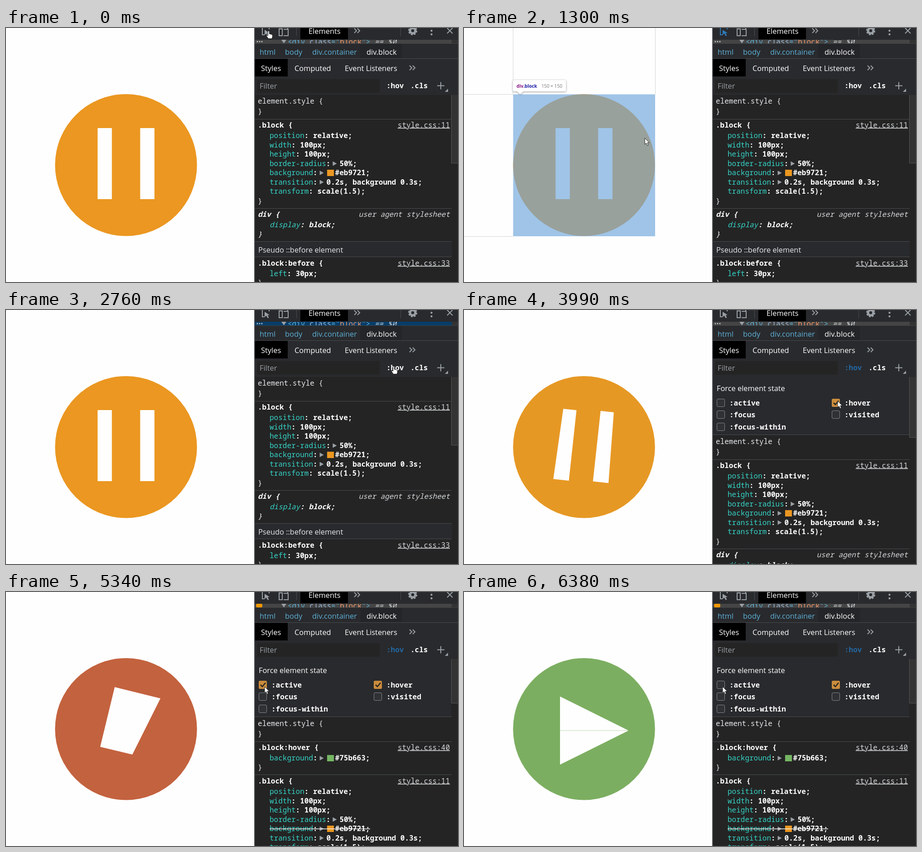
Animation of 998 by 561 pixels, one loop 7.26 s. Source, as an HTML page:

```html
<!DOCTYPE html>
<html lang="en">
<head>
<meta charset="utf-8">
<title>Forcing element states</title>
<style>
html, body { margin: 0; width: 100%; height: 100%; overflow: hidden; background: #fefefe; }
svg { display: block; width: 998px; height: 561px; }
text { font: 16.4px "Open Sans", "Noto Sans", sans-serif; fill: #fff; white-space: pre; }
.m { font: 500 16px "Noto Sans Mono", "DejaVu Sans Mono", monospace; }
.v { font-weight: 600; }
.b { font-weight: 700; }
.i { font-style: italic; }
.n { fill: #35d4c7; font-weight: 500; }
.s { fill: #e8eaed; }
.link { fill: #d5d7da; text-decoration: underline; }
.plain { fill: #d5d7da; }
.end { text-anchor: end; }
.tip { font-size: 10.2px; }
.ico { fill: none; stroke: #9aa0a6; stroke-width: 2; }
</style>
</head>
<body>
<svg id="stage" viewBox="0 0 998 561"></svg>
<script>
const LOOP = 7260, CH = 9.6;
const BAR = '#292a2d', BODY = '#242424', EDGE = '#494c50', ROW = '#454545';
const ORANGE = [235, 151, 33], GREEN = [124, 174, 97], RED = [213, 79, 53];

// ---- markup helpers ----
const text = (x, y, s, cls = '', fill = '') =>
  `<text x="${x}" y="${y}" class="${cls}"${fill && ` style="fill:${fill}"`}>${s}</text>`;
const rect = (x, y, w, h, fill, more = '') =>
  `<rect x="${x}" y="${y}" width="${w}" height="${h}" fill="${fill}" ${more}/>`;
const path = (d, more = 'class="ico"') => `<path d="${d}" ${more}/>`;
const group = (id, body) => `<g id="${id}">${body}</g>`;
const rule = y => rect(549, y, 435, 1, EDGE);
const mono = (x, y, s, cls = 's') => text(x, y, s, 'm ' + cls);
const link = (y, line) => mono(980, y, 'style.css:' + line, 'link end');

// One declaration; `arrow` adds the expander, `color` the swatch
function prop(y, name, value, { arrow, color, cls = 'v' } = {}) {
  let x = 582 + (name.length + 1) * CH, out = '';
  if (arrow) out += path(`M${x + 5} ${y - 10}v10l9 -5z`, 'fill="#9aa0a6"');
  x += arrow ? 20 : CH;
  if (color) {
    out += rect(Math.round(x + 1), y - 12, 15, 14, color);
    x += 19;
  }
  return mono(582, y, `<tspan class="n">${name}</tspan>:`, cls) + out + mono(x, y, value, cls);
}
const strike = (id, y) => group(id, rect(582, y - 5.5, 222, 1.4, '#fff'));

const stateRule = (id, state, line, hex) => group(id,
  mono(556, 219.5, `.block:${state} {`, 'v') + link(219.5, line) +
  prop(243, 'background', hex + ';', { arrow: 1, color: hex }) +
  mono(556, 263.5, '}') + rule(274));

function checkbox(x, y, label, id) {
  return rect(x + .5, y + .5, 17, 17, '#303134', 'rx="2.5" stroke="#85888c"') +
    (id ? group(id, rect(x, y, 18, 18, '#cb8c3c', 'rx="3"') +
      path(`M${x + 4} ${y + 9}l4 4l7 -8.5`, 'fill="none" stroke="#222" stroke-width="2.5"')) : '') +
    mono(x + 28, y + 14.5, label, 'v');
}
const chevrons = (x, y) => path(`M${x} ${y - 5}l5 5l-5 5m7 -10l5 5l-5 5`, 'class="ico" stroke-width="1.5"');

// ---- page side ----
const page =
  '<circle id="disc" cx="265" cy="302.7" r="156.7"/>' +
  '<polygon id="left" fill="#fefefe"/><polygon id="right" fill="#fefefe"/>' +
  group('overlay',
    rect(108.5, 146.5, 313.5, 313.5, 'rgba(111,168,220,.66)') +
    path('M108.5 0V146M422.5 0V146M0 146.5H108M0 460.5H108', 'stroke="#d3d6d8" fill="none"') +
    '<g style="filter:drop-shadow(0 1px 2px #0006)">' +
    path('M111 115H222a3 3 0 0 1 3 3V137a3 3 0 0 1 -3 3H131l-7 6l-7 -6H111a3 3 0 0 1 -3 -3V118a3 3 0 0 1 3 -3z', 'fill="#fff"') +
    '</g>' +
    text(116, 132, '<tspan style="fill:#881280">div</tspan>.block', 'tip b', '#1a1aa6') +
    text(171, 132, '150 × 150', 'tip', '#777'));

// ---- tools side ----
const rest = group('rest',
  mono(556, 219.5, '.block {', 'v') + link(219.5, 11) +
  prop(243, 'position', 'relative;') +
  prop(263.5, 'width', '100px;') +
  prop(284, 'height', '100px;') +
  prop(304.5, 'border-radius', '50%;', { arrow: 1 }) +
  prop(325, 'background', '#eb9721;', { arrow: 1, color: '#eb9721' }) + strike('strikeBase', 325) +
  prop(345.5, 'transition', '0.2s, background 0.3s;', { arrow: 1 }) +
  prop(366, 'transform', 'scale(1.5);') +
  mono(556, 387.5, '}') + rule(398) +
  mono(556, 417, 'div {', 'i v') + mono(980, 417, 'user agent stylesheet', 'i end plain') +
  prop(440, 'display', 'block;', { cls: 'i v' }) +
  mono(556, 461, '}', 'i') +
  rect(549, 472, 435, 33, BAR) + rule(471) + rule(505) +
  text(557, 495.5, 'Pseudo ::before element', 's') +
  mono(556, 524.5, '.block:before {', 'v') + link(524.5, 33) +
  prop(548, 'left', '30px;') + mono(556, 568, '}'));

const tools =
  rect(549, 0, 449, 561, BODY) +
  '<g clip-path="url(#below)">' + group('rules',
    mono(556, 166.5, 'element.style {') + mono(556, 190, '}') + rule(201) +
    stateRule('activeRule', 'active', 45, '#dd4b2f') +
    group('hoverRule', stateRule('hoverBody', 'hover', 40, '#75b663') + strike('strikeHover', 243)) +
    rest) + '</g>' +
  rect(984, 108, 14, 453, BODY) +
  rect(983.5, 108.5, 15, 190, '#333', 'id="thumb" stroke="#555"') +
  group('states', rect(549, 148, 434, 127, BAR) + rule(275) +
    text(558, 179, 'Force element state') +
    checkbox(558, 196, ':active', 'checkActive') + checkbox(812, 196, ':hover', 'checkHover') +
    checkbox(558, 222, ':focus') + checkbox(812, 222, ':visited') + checkbox(558, 249, ':focus-within')) +
  rect(549, 0, 449, 148, BAR) +
  // main toolbar
  rect(650, 0, 105, 25, '#000') + text(668, 13, 'Elements') + chevrons(769, 6) +
  group('pick', path('M581 3V-3H566V15H571') + path('M571 4V15.5L574.5 12.5L578 18L580.5 16.5L577.5 11.5L582 11z', 'fill="currentColor"')) +
  path('M606 -3H622V4M603 2H610V17H603zM613 17H623V3H613') +
  rect(641, 0, 1, 18, EDGE) + rect(871, 0, 1, 18, EDGE) +
  '<circle cx="898" cy="6" r="5.8" fill="none" stroke="#9aa0a6" stroke-width="5"/>' +
  '<circle cx="898" cy="6" r="8.6" fill="none" stroke="#9aa0a6" stroke-width="3" stroke-dasharray="4 2.75"/>' +
  [-2, 6, 14].map(y => `<circle cx="939.5" cy="${y}" r="2.2" fill="#9aa0a6"/>`).join('') +
  path('M974 0l12 12m0 -12l-12 12') +
  // selected tree row
  '<g clip-path="url(#row)">' + rect(549, 26, 435, 8, ROW, 'id="rowBg"') + rect(984, 26, 14, 8, '#333') +
  group('more', [555, 560, 565].map(x => `<circle cx="${x}" cy="30" r="1.5" fill="#c5c8cb"/>`).join('')) +
  '<circle id="mark" cx="559" cy="30" r="7" fill="#f29900"/>' +
  path('M608 26h11l-5.5 8z', 'fill="#9aa0a6"') +
  text(622, 36, '&lt;div <tspan style="fill:#9bbbdc">class</tspan>="<tspan style="fill:#f29766">block</tspan>"&gt;', 'm', '#5db0d7') +
  mono(814, 36, '== $0', 'i plain') + '</g>' +
  rect(549, 34, 449, 1, '#3c4043') +
  // breadcrumbs, tabs, filter
  rect(782, 35, 92, 32, '#242528') +
  [[560, 'html'], [616, 'body'], [676, 'div.container']].map(a => text(a[0], 59, a[1], '', '#5db0d7')).join('') +
  text(796, 59, 'div.block') + rect(549, 67, 449, 1, EDGE) +
  rect(549, 68, 73, 39, '#000') + text(563, 95, 'Styles') + text(637, 95, 'Computed') +
  text(748, 95, 'Event Listeners') + chevrons(891, 88) +
  rect(554, 113, 271, 30, BODY) + text(560, 134, 'Filter', '', '#9aa0a6') +
  '<text id="hov" x="840" y="133" class="m b">:hov</text>' + mono(893, 133, '.cls', 'b') +
  path('M952 127.5h16m-8 -8v16') + path('M976 134v7h-7z', 'fill="#9aa0a6"') +
  rect(548, 0, 1.5, 561, '#55585c');

const cursor = group('cursor',
  '<circle id="click" r="10.5" fill="#f5c60f" fill-opacity=".9"/>' +
  path('M0 0V14L3.2 11.2L5.6 16.6L8 15.5L5.7 10.3H10z', 'id="arrow" fill="#fff" stroke="#222"') +
  path('M-1.5 1.5Q0 -1 1.5 1.5V7L6 8Q8.5 8.5 8.5 11Q8.5 14 7 17.5H-.5Q-4 13 -5 11Q-4.5 9 -1.5 11z',
    'id="hand" fill="#fff" stroke="#222"'));

const clip = (id, y, h) => `<clipPath id="${id}"><rect x="549" y="${y}" width="449" height="${h}"/></clipPath>`;
document.getElementById('stage').innerHTML =
  `<defs>${clip('below', 148, 413)}${clip('row', 26, 8)}</defs>` + page + tools + cursor;

// ---- animation ----
const el = id => document.getElementById(id);
const set = (id, name, v) => el(id).setAttribute(name, v);
const show = (id, on) => set(id, 'visibility', on ? 'inherit' : 'hidden');
const move = (id, x, y) => set(id, 'transform', `translate(${x} ${y})`);
const clamp = x => Math.min(1, Math.max(0, x));
const lerp = (a, b, k) => a + (b - a) * k;
const mix = (a, b, k) => a.map((v, i) => lerp(v, b[i], k));
const easeOut = x => 1 - (1 - clamp(x)) ** 2;
const smooth = x => (x = clamp(x)) * x * (3 - 2 * x);

const STARTS = [0, 530, 840, 990, 1530, 1760, 1840, 2000, 2760, 3300, 3760, 3990, 4080, 4550, 5340, 5440, 6140, 6380];
function stepTime(t) {
  const s = STARTS.filter(v => v <= t).pop();
  return s + 75 * Math.floor((t - s) / 75);
}

const MOVES = [[800, 1365, 390, 255], [1940, 2675, 856, 124], [3240, 3600, 825, 201], [4500, 5250, 571, 209]];
const CLICKS = [[530, 610], [1760, 1840], [2835, 2910], [3835, 3910], [5225, 5340], [6140, 6215]];

// Half of the icon: a bar at p = 0, half of the play triangle at p = 1; side is -1 or 1
function half(p, side) {
  const cx = lerp(265 + side * 47, 287.5, p), cy = lerp(299.5, 306 + side * 37.8, p);
  const w = lerp(31.5, 75, p), top = lerp(31.5, 0, p), h = lerp(78.5, 75.5, p);
  const inner = -side * w / 2, a = p * Math.PI / 2, c = Math.cos(a), s = Math.sin(a);
  return [[inner, -h], [inner + side * top, -h], [inner + side * w, h], [inner, h]]
    .map(([x, y]) => [cx + x * c - y * s, cy + x * s + y * c]).join(' ');
}

const PLAY = [212, 231, 363, 306, 363, 306, 212, 381];
const TURN = [240, 210, 341, 235, 279, 359, 208, 342];
const STOP = [202, 240, 328, 240, 328, 366, 202, 366];
const stopShape = k => k < .8 ? mix(PLAY, TURN, k / .8) : mix(TURN, STOP, (k - .8) / .2);

function draw(ms) {
  const t = stepTime(ms);

  // icon
  const brush = t >= 2000 && t < 2225 ? .2 * (1 - Math.abs(t - 2085) / 140) : 0;
  const p = Math.max(clamp(brush), easeOut((t - 3983) / 200));
  const tint = Math.max(clamp(brush * .7), easeOut((t - 3983) / 300));
  const k = t < 5340 ? 0 : t < 5440 ? .8 : t < 5515 ? .96 : t < 6380 ? 1 - easeOut((t - 6180) / 200) : 0;
  set('disc', 'fill', `rgb(${mix(mix(ORANGE, GREEN, tint), RED, k).map(Math.round)})`);
  set('left', 'points', k ? stopShape(k).join(' ') : half(p, -1));
  set('right', 'points', k ? '' : half(p, 1));
  show('overlay', t >= 915 && t < 1760);

  // tools
  const open = t >= 2910, hover = t >= 4230, active = t >= 5515 && t < 6290;
  show('states', open);
  show('checkHover', t >= 3910);
  show('checkActive', t >= 5340 && t < 6215);
  show('hoverRule', hover);
  show('activeRule', active);
  show('strikeBase', hover);
  show('strikeHover', active);
  show('mark', hover);
  show('more', !hover);
  move('rules', 0, open ? 129 : 0);
  move('hoverRule', 0, active ? 74 : 0);
  move('rest', 0, 74 * (hover + active));
  set('thumb', 'height', active ? 112 : hover ? 137 : open ? 173 : 190);
  set('rowBg', 'fill', t >= 1760 && !open ? '#073d69' : ROW);
  el('hov').style.fill = open ? '#2368a2' : '#fff';
  const pickColor = t >= 530 && t < 1760 ? '#2d78b5' : '#9aa0a6';
  el('pick').style.color = pickColor;
  el('pick').firstChild.style.stroke = pickColor;

  // cursor
  let x = 580, y = 6;
  for (const [a, b, tx, ty] of MOVES) {
    const f = smooth((t - a) / (b - a));
    x = lerp(x, tx, f);
    y = lerp(y, ty, f);
  }
  move('cursor', x, y);
  const hand = t < 840 || t >= 2600 && t < 3375;
  show('hand', hand);
  show('arrow', !hand);
  show('click', CLICKS.some(([a, b]) => t >= a && t < b));
}

const start = performance.now();
function frame() {
  draw((performance.now() - start) % LOOP);
  requestAnimationFrame(frame);
}
frame();
</script>
</body>
</html>
```
